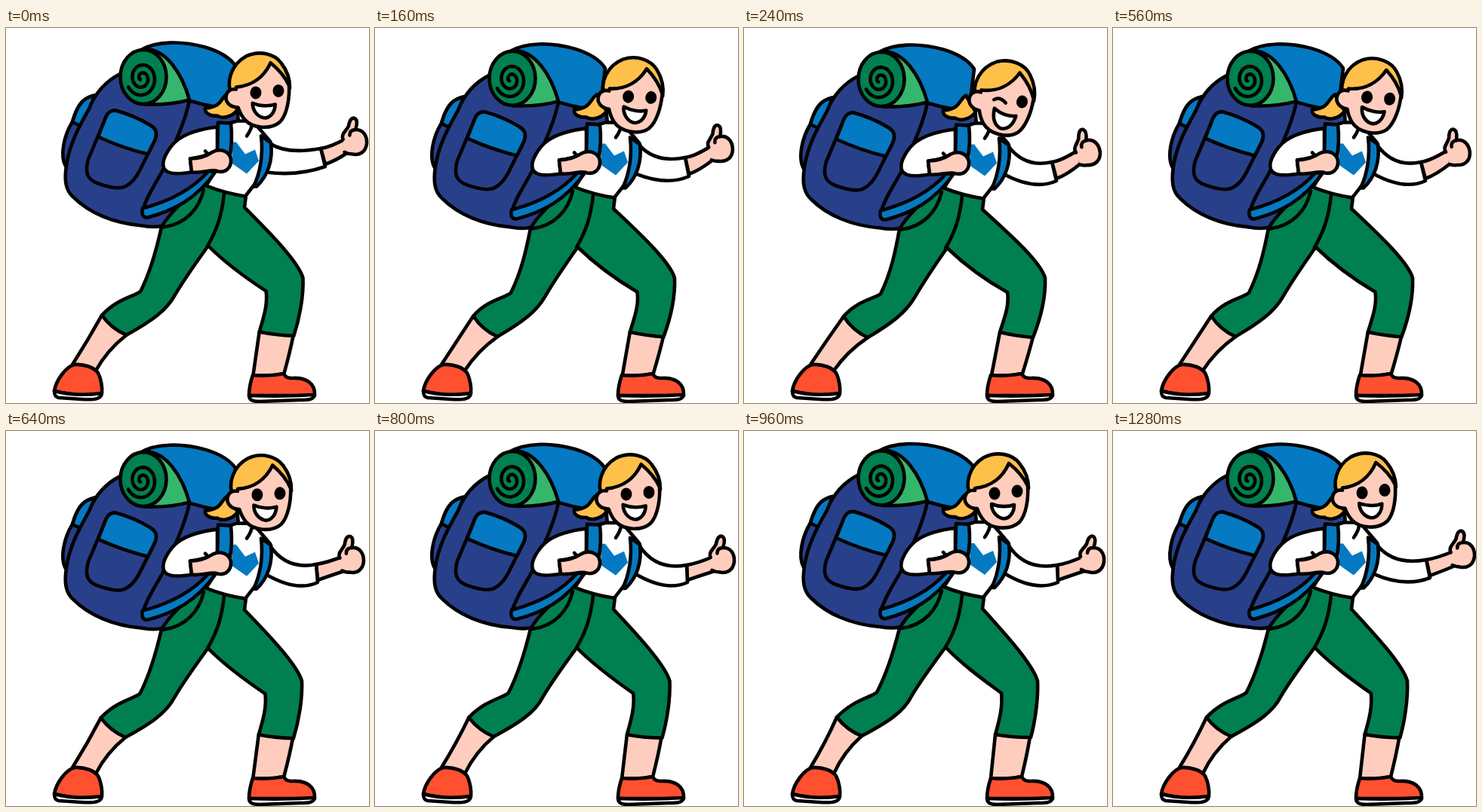
These frames come from a looping animation (481 by 498 pixels, 1440 ms). An HTML page:

```html
<!DOCTYPE html>
<html lang="en">
<meta charset="utf-8">
<title>Hiker</title>
<style>
  html, body { margin: 0; height: 100%; overflow: hidden; background: #fff }
  svg { display: block; width: 100vw; height: 100vh; stroke: #000; stroke-width: 4.6; stroke-linecap: round; stroke-linejoin: round; fill: none }
  .navy { fill: #28408a }
  .blue { fill: #0579c1 }
  .green { fill: #008050 }
  .lime { fill: #36b66c }
  .skin { fill: #ffcdbe }
  .hair { fill: #ffc04a }
  .shoe { fill: #ff5030 }
  .white { fill: #fff }
  .ink { fill: #000; stroke: none }
</style>
<svg viewBox="0 0 481 498">
  <g class="body">
    <!-- backpack -->
    <path class="navy" d="M117 87C104 90 97 97 91 113L88 122C77 140 71 167 79 181L90 184Z"/>
    <path class="blue" d="M117 87C104 90 97 97 91 113L88 122Q95 127 104 128Z"/>
    <path class="navy" d="M152 58C132 68 118 84 110 105C96 130 84 152 80 180C77 200 79 213 89 222C110 243 142 257 180 260C192 262 202 262 208 260C226 246 244 228 262 208L308 122L304 80L200 55Z"/>
    <path d="M243 94C238 120 224 150 208 186C196 208 186 222 181 240"/>
    <path class="blue" d="M178 27C198 15 232 14 264 23C284 29 298 38 305 49L300 90L282 103Q262 100 243 94C236 72 222 48 195 28Z"/>
    <path class="lime" d="M182 26C212 23 234 60 243 93Q218 100 184 99Z"/>
    <ellipse class="green" cx="182" cy="62.500" rx="30.500" ry="36"/>
    <path id="spiral"/>
    <path class="navy" d="M145 107C136 107 133 113 130 122L109 172C104 190 108 199 122 204C136 209 150 212 158 208C168 203 173 195 177 187L197 147C201 137 199 131 190 126C175 117 160 111 145 107Z"/>
    <path class="blue" d="M145 107C136 107 133 113 130 122L122 142Q155 157 188 165L197 147C201 137 199 131 190 126C175 117 160 111 145 107Z"/>
  </g>

  <path id="forearm" class="skin"/>
  <path id="sleeve" class="white"/>
  <g id="fist">
    <path class="skin" d="M446 167C443 160 450 157 454 150C456 142 459 138 463 140C467 143 465 150 463 155C474 155 478 165 477 174C475 186 466 190 456 187C452 187 449 185 447 184"/>
    <path d="M463 155Q455 155 455 162"/>
  </g>

  <path id="ankles" class="skin"/>
  <path class="shoe" d="M64 482C66 468 80 449 91 447C104 446 117 451 122 458C126 466 128 478 127 485L122 488Q92 489 64 482Z"/>
  <path class="white" d="M64 482C82 487 105 488 127 485C126 493 118 494 100 493L70 491C65 490 64 487 64 482Z"/>
  <path class="shoe" d="M327 461C324 470 322 480 322 488H409C410 472 398 464 380 465C372 465 370 463 368 459Q348 463 327 461Z"/>
  <path class="white" d="M322 488Q365 490 409 487C408 494 400 494 390 494L335 496C325 496 322 493 322 488Z"/>
  <path id="pants" class="green"/>

  <g class="body">
    <path d="M262 212C256 238 238 258 209 262M289 218C286 245 280 265 267 287"/>
    <!-- shirt and straps -->
    <path class="white" d="M279 129L306 121H327L350 148C350 172 340 196 331 203L317 221Q290 217 265 207L279 185Z"/>
    <path class="blue" stroke="none" d="M300 149H305L317 165L330 159L335 174L319 191L299 177Z"/>
    <path class="blue" d="M338 141C341 165 337 190 328 208L332 208C347 194 354 173 351 150Z"/>
    <path class="blue" d="M268 188C245 214 215 228 181 237C179 245 182 250 188 249C222 240 252 225 278 188Z"/>
    <path class="white" d="M280 129C262 131 242 136 229 145C218 153 205 172 209 183C212 192 228 192 246 189L244 171Q262 169 280 161Z"/>
    <path d="M264 161Q268 167 276 167"/>
    <path class="blue" d="M281 123L298 124C300 142 299 156 296 170L280 165Z"/>
    <path class="skin" d="M244 171C258 171 268 166 274 162C284 157 296 161 298 172C299 184 290 190 281 188C272 184 262 191 246 189Z"/>
    <path d="M326 124Q326 131 319 141"/>
    <path class="hair" d="M294 84C284 90 288 102 264 104C263 110 270 115 280 114C285 118 299 117 307 106Z"/>
  </g>

  <g id="head">
    <path class="hair" d="M301 88C291 70 299 46 318 35C336 26 356 31 365 43C373 53 377 64 377 76L350 90Z"/>
    <path class="skin" d="M306 76C328 74 343 61 351 43C361 51 370 60 376 73C377 90 374 111 365 121C353 132 329 131 318 119Q312 112 309 103C298 103 291 96 293 87C294 81 300 78 306 79"/>
    <ellipse id="eye" class="ink" cx="332" cy="83" rx="7.500" ry="8.500"/>
    <path id="wink" d="M325 85Q332 79 341 86"/>
    <ellipse class="ink" cx="362" cy="80" rx="7.500" ry="8.500"/>
    <path id="mouth" class="white"/>
  </g>
</svg>
<script>
const $ = id => document.getElementById(id);
const bodies = document.querySelectorAll('.body');
const draw = (id, d) => $(id).setAttribute('d', d);
const move = (el, x, y, turn = 0, cx = 0, cy = 0) =>
  el.setAttribute('transform', `translate(${x} ${y}) rotate(${turn} ${cx} ${cy})`);

// Blends two paths that share the same commands.
function mix(a, b, k) {
  const ends = b.match(/\d+/g);
  let i = 0;
  return a.replace(/\d+/g, n => +n + (ends[i++] - n) * k);
}

const PANTS = [
  'M264 205C240 222 218 242 206 262C199 290 190 320 176 347C168 354 145 357 123 380Q136 397 156 405C190 387 212 373 222 352C235 330 250 310 267 287C290 311 318 331 341 348C343 365 339 382 333 403Q355 407 380 407C386 385 390 355 389 332C383 310 345 268 316 236L318 220Z',
  'M262 210C240 227 218 247 206 267C201 295 195 325 181 353C172 360 150 362 132 383Q144 402 164 411C196 392 214 378 226 358C240 334 253 315 269 292C292 314 322 336 349 351C352 368 345 385 339 404Q360 409 383 411C392 388 400 358 399 332C393 310 350 272 316 241L318 225Z'
];
const ANKLES = [
  'M123 380Q108 414 88 447Q104 454 119 455Q132 426 156 405ZM333 403L327 461Q350 463 368 459Q375 430 379 406Z',
  'M132 383Q110 414 88 447Q104 454 119 455Q136 430 164 411ZM339 404L328 461Q350 463 369 459Q378 430 383 410Z'
];
const SMILE = 'M328 97C338 101 350 101 358 98C358 110 350 118 342 116C334 114 328 106 328 97Z';
const GRIN = 'M328 96C338 102 350 103 358 100C357 114 349 122 340 120C332 117 328 108 328 96Z';

// at: start in ms, sink: body drop, head/fist: x, y, angle, cuff: top and bottom points
const POSES = [
  { at: 0, sink: .45, head: [-1, 3, 1], fist: [1, -20, -3], cuff: [417, 160, 423, 184] },
  { at: 160, sink: .8, head: [4, 9, 8], fist: [-3, -11, -9], cuff: [411, 172, 416, 197] },
  { at: 240, sink: 1, head: [7, 13, 12], fist: [-5, -6, -15], cuff: [408, 178, 414, 203], wink: true },
  { at: 560, sink: .8, head: [5, 10, 10], fist: [-4, -6, -13], cuff: [408, 178, 414, 203] },
  { at: 640, sink: .3, head: [1, 2, 2], fist: [-3, 0, -6], cuff: [411, 177, 413, 201] },
  { at: 800, sink: .15, head: [1, 1, 1], fist: [-1, 0, -3], cuff: [413, 178, 414, 201] },
  { at: 960, sink: 0, head: [0, 0, 0], fist: [0, 0, 0], cuff: [415, 178, 416, 201] },
  { at: 1280, sink: .1, head: [-2, -1, -1], fist: [2, -7, -4], cuff: [415, 171, 420, 195] }
];

function show({ sink, head, fist, cuff: [tx, ty, bx, by], wink }) {
  const drop = 5.5 * sink, [fx, fy] = fist;
  bodies.forEach(el => move(el, 0, drop));
  draw('pants', mix(...PANTS, sink));
  draw('ankles', mix(...ANKLES, sink));
  draw('forearm', `M${tx} ${ty}Q${tx + 14} ${ty - 2} ${451 + fx} ${166 + fy}V${186 + fy}Q${bx + 14} ${by - 8} ${bx} ${by - 3}Z`);
  draw('sleeve', `M350 ${151 + drop}Q372 ${ty + 8} ${tx} ${ty}L${bx} ${by}Q386 ${by + 13} 345 ${189 + drop}Z`);
  move($('fist'), ...fist, 462, 173);
  move($('head'), ...head, 338, 80);
  $('eye').style.display = wink ? 'none' : '';
  $('wink').style.display = wink ? '' : 'none';
  draw('mouth', wink ? GRIN : SMILE);
}

const coil = Array.from({ length: 80 }, (_, i) => {
  const r = 3 + i * .27, a = 2.4 + i / 79 * 12.8;
  return `${180 + .85 * r * Math.cos(a)} ${64 + r * Math.sin(a)}`;
});
draw('spiral', 'M' + coil.join('L'));

const start = performance.now();
function tick() {
  const t = (performance.now() - start) % 1440;
  show(POSES.findLast(pose => pose.at <= t));
  requestAnimationFrame(tick);
}
tick();
</script>
</html>
```
